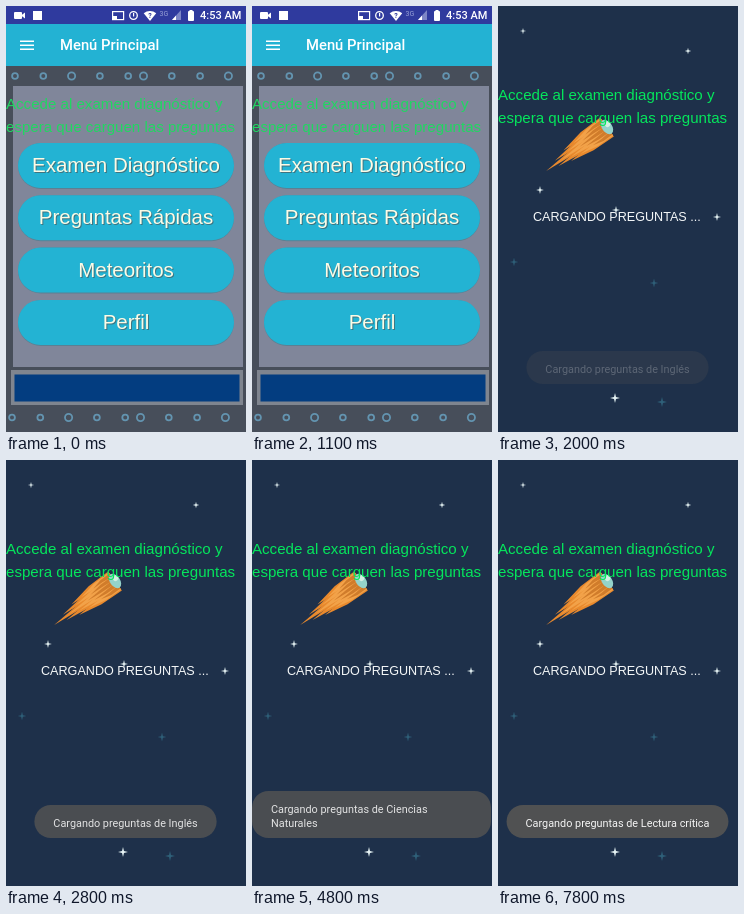
An HTML page with a canvas that plays this animation: 240 px wide and 426 px high, repeating every 7.9 s.

```html
<!DOCTYPE html>
<html lang="es">
<head>
<meta charset="utf-8">
<title>Menú Principal</title>
<style>
html, body { margin: 0; width: 100%; height: 100%; overflow: hidden; background: #1e304a; }
canvas { display: block; width: 240px; height: 426px; }
</style>
</head>
<body>
<canvas id="stage" width="240" height="426"></canvas>
<script>
const LOOP = 7900, STEP = 100, OPEN = 1500;
const HAND = '"Liberation Sans", sans-serif';
const ROBOTO = 'Roboto, sans-serif';
const BAR = '#2f3a9e', WHITE = '#fff';
const c = document.getElementById('stage').getContext('2d');
const clamp = x => Math.max(0, Math.min(1, x));
const easeOut = (t, start, duration, power) =>
  1 - (1 - clamp((t - start) / duration)) ** power;

function rect(x, y, w, h, color) {
  c.fillStyle = color;
  c.fillRect(x, y, w, h);
}

function pill(x, y, w, h, r, color) {
  c.beginPath();
  c.roundRect(x, y, w, h, r);
  c.fillStyle = color;
  c.fill();
}

function poly(color, ...pts) {
  c.beginPath();
  for (let i = 0; i < pts.length; i += 2) c.lineTo(pts[i], pts[i + 1]);
  c.closePath();
  c.fillStyle = color;
  c.fill();
}

function ring(x, y, r, color, width) {
  c.beginPath();
  c.arc(x, y, r, 0, 7);
  c.strokeStyle = color;
  c.lineWidth = width;
  c.stroke();
}

function text(str, x, y, font, color, align = 'left') {
  c.font = font;
  c.textAlign = align;
  c.fillStyle = color;
  c.fillText(str, x, y);
}

// Runs draw() with the given opacity and shift
function layer(alpha, x, y, draw) {
  if (alpha <= 0) return;
  c.save();
  c.globalAlpha = alpha;
  c.translate(x, y);
  draw();
  c.restore();
}

function statusIcons() {
  // Camera, notification, cast
  pill(8, 6, 8, 7, 1, WHITE);
  poly(WHITE, 15, 9.5, 19, 6.5, 19, 12.5);
  rect(27, 5, 9, 9, WHITE);
  c.strokeStyle = WHITE;
  c.lineWidth = 1.2;
  c.strokeRect(106.6, 5.6, 11, 8);
  rect(107, 10, 4, 4, WHITE);
  // Alarm, wifi, signal, battery
  ring(127.5, 9.5, 3.8, WHITE, 1.3);
  rect(127, 7, 1.2, 3.5, WHITE);
  c.beginPath();
  c.moveTo(144, 15);
  c.arc(144, 15, 10, -2.25, -0.9);
  c.fillStyle = WHITE;
  c.fill();
  text('?', 144, 12, 'bold 7px ' + ROBOTO, BAR, 'center');
  text('3G', 153.5, 10, '7px ' + ROBOTO, '#97a0d6');
  poly('#7d86c6', 166, 14, 175, 14, 175, 4);
  poly(WHITE, 166, 14, 170, 14, 170, 9.5);
  pill(182, 5, 6, 10, 1, WHITE);
  rect(183.5, 4, 3, 2, WHITE);
  text('4:53 AM', 194, 13, '500 11px ' + ROBOTO, WHITE);
}

// Two runs of evenly spaced screws, every third one larger
function screws(x, y) {
  for (let i = 0; i < 9; i++)
    ring(x + 28.3 * i - (i > 4 ? 13 : 0), y, i % 3 === 2 ? 3.6 : 2.9, '#6394b0', 1.8);
}

function menu() {
  rect(0, 60, 240, 366, '#474e5a');
  rect(7, 80, 230, 281, '#80869a');
  rect(5, 364, 232, 35, '#7f858f');
  rect(8.5, 368.5, 225, 27, '#033d80');
  screws(9, 70);
  screws(6, 411.5);

  rect(0, 0, 240, 18, BAR);
  rect(0, 18, 240, 42, '#23b2d3');
  for (let i = 0; i < 3; i++) rect(14, 34.5 + 4 * i, 14, 1.5, WHITE);
  text('Menú Principal', 54, 44, '500 14.8px ' + ROBOTO, WHITE);

  const font = '20.5px ' + HAND;
  ['Examen Diagnóstico', 'Preguntas Rápidas', 'Meteoritos', 'Perfil'].forEach((label, i) => {
    const y = 137 + i * 52.3;
    pill(12, y, 216, 46, 23, '#5b8093');
    pill(12, y, 216, 45, 22.5, '#23b3d3');
    text(label, 121, y + 30, font, '#3f7480', 'center');
    text(label, 120, y + 29, font, '#fbfbe6', 'center');
  });
}

function star(x, y, color) {
  const r = 3 + y / 200;
  c.beginPath();
  for (let i = 0; i < 8; i++) {
    const a = i * Math.PI / 4, d = i % 2 ? r * 0.28 : r;
    c.lineTo(x + d * Math.cos(a), y + d * Math.sin(a));
  }
  c.fillStyle = color;
  c.fill();
}

// Tongues of flame behind a round head, drawn along the flight axis
function comet() {
  layer(c.globalAlpha, 109, 121, () => {
    c.rotate(Math.atan2(44, -61));
    for (const [size, color] of [[1, '#e8892d'], [0.75, '#f2a249'], [0.45, '#d07c2b']])
      for (let i = -2; i <= 2; i++) {
        const y = 3.6 * i, half = 4.5 * size, len = (75 - 13 * Math.abs(i)) * size;
        poly(color, 0, y - half, len * 0.5, y * 1.1 - half * 0.7, len, y * 0.9,
          len * 0.5, y * 1.1 + half * 0.7, 0, y + half);
      }
    c.beginPath();
    c.ellipse(0, 0, 5, 8, 0, 0, 7);
    c.fillStyle = '#94d3cb';
    c.fill();
    c.beginPath();
    c.arc(-2, 2, 2.8, 0, 7);
    c.fillStyle = '#d4eee3';
    c.fill();
  });
}

function space() {
  rect(0, -40, 240, 500, '#1e304a');
  for (const [x, y] of [[16, 256], [156, 277], [164, 396]]) star(x, y, '#2f6079');
  for (const [x, y] of [[25, 25], [190, 45], [42, 184], [118, 204], [219, 211], [117, 392]])
    star(x, y, '#e6f3f4');
  comet();
  text('CARGANDO PREGUNTAS ...', 35, 215, '12.6px ' + HAND, '#f4f7f8');
}

const toasts = ['Inglés', 'Ciencias\nNaturales', 'Ciencias Sociales', 'Lectura crítica']
  .map(subject => 'Cargando preguntas de ' + subject);

function toast(message) {
  const font = '10.85px ' + ROBOTO;
  const lines = message.split('\n');
  c.font = font;
  const w = Math.min(239, c.measureText(lines.join(' ')).width + 38);
  const x = 119.5 - w / 2, top = 359 - 14 * lines.length;
  pill(x, top, w, 378 - top, 16.5, '#505152');
  lines.forEach((line, i) => text(line, x + 19, top + 21.5 + 14 * i, font, '#f5f5f5'));
}

function render(t) {
  const slide = 34 * (1 - easeOut(t, OPEN, 350, 5));
  const barOut = clamp((t - 1600) / 200);

  layer(1, 0, 0, menu);
  layer(easeOut(t, OPEN, 200, 5), 0, slide, space);
  if (t > OPEN) layer(0.5 * (1 - barOut), 0, 0, () => rect(0, 0, 240, 18, BAR));
  layer(1 - barOut, 0, 0, statusIcons);

  const y = 103 - 9 * clamp((t - 1600) / 250);
  const green = t < OPEN ? '#20d762' : '#05e65c';
  ['Accede al examen diagnóstico y', 'espera que carguen las preguntas'].forEach((line, i) =>
    text(line, 0, y + 23 * i, '15.1px ' + HAND, green));

  // A new toast takes over every two seconds
  toasts.forEach((message, i) => {
    const start = Math.max(1900, 1100 + 2000 * i), end = 2700 + 2000 * i;
    const alpha = clamp((t - start) / 400) * (1 - clamp((t - end) / 300) ** 2);
    layer(alpha, 0, 0, () => toast(message));
  });
}

const begin = performance.now();
function tick() {
  const t = (performance.now() - begin) % LOOP;
  render(t - t % STEP);
  requestAnimationFrame(tick);
}
tick();
</script>
</body>
</html>
```
